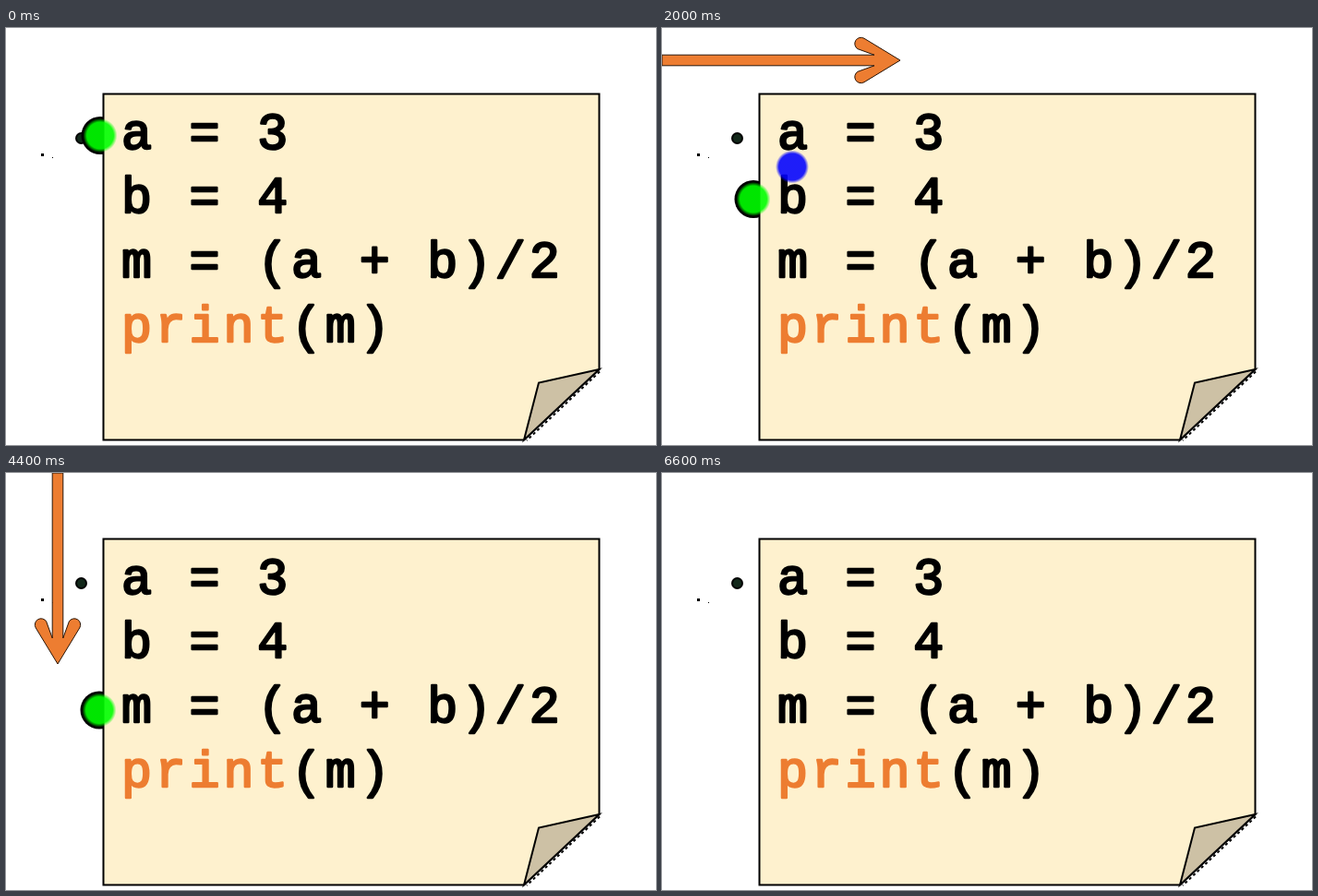
Recreate the animation shown at these times as an HTML page. Size 704x452 px, loop 6800 ms.

```html
<!DOCTYPE html>
<html>
<head>
<meta charset="utf-8">
<style>
  html, body { margin: 0; width: 100%; height: 100%; overflow: hidden; background: #fff; }
  svg { display: block; }
  text {
    font: 55px "Liberation Mono", monospace;
    letter-spacing: 3.8px;
    white-space: pre;
    stroke: #000;
    stroke-width: 2.4;
    stroke-linejoin: round;
  }
  .keyword { fill: #ed7d31; stroke: #ed7d31; }
</style>
</head>
<body>
<svg width="704" height="452" viewBox="0 0 704 452">
  <defs>
    <radialGradient id="green">
      <stop offset=".78" stop-color="#0f0" stop-opacity=".9"/>
      <stop offset="1" stop-color="#0f0" stop-opacity="0"/>
    </radialGradient>
    <radialGradient id="blue">
      <stop offset=".8" stop-color="#00f" stop-opacity=".88"/>
      <stop offset="1" stop-color="#00f" stop-opacity="0"/>
    </radialGradient>
  </defs>

  <circle cx="81.5" cy="119.5" r="5.5" fill="#12281a" stroke="#000" stroke-width="2"/>
  <path d="M38 136h3v3h-3zM50 140h1v1h-1z"/>

  <circle id="lineHalo" r="20.5"/>
  <circle id="tokenHalo" r="20"/>

  <g stroke="#000" stroke-width="2">
    <path d="M643 372.5L564 447" stroke-dasharray="3 3"/>
    <path d="M105.5 71.5H642.5V370L561 446.5H105.5Z" fill="#fef1ce"/>
    <path d="M642.5 370L577 384.5L561 446.5Z" fill="#cdc1a5"/>
  </g>

  <text x="125" y="131">a = 3</text>
  <text x="125" y="200">b = 4</text>
  <text x="125" y="270">m = (a + b)/2</text>
  <text x="125" y="340"><tspan class="keyword">print</tspan>(m)</text>

  <circle id="lineBall" r="18.5" fill="url(#green)"/>
  <circle id="tokenBall" r="18" fill="url(#blue)"/>
  <path id="arrow" fill="#ed7d31" stroke="#2a1608"/>
</svg>

<script>
const STEP = 200, STEPS = 34, CYCLE = 8;

// Per code line: marker position, then height and x stops of the token ball
const lines = [
  { marker: [102, 116.5], tokenY: 70.5, tokens: [141, 215, 290.5] },
  { marker: [99, 185.5], tokenY: 150.5, tokens: [141, 215, 290.5] },
  { marker: [101, 257], tokenY: 222, tokens: [139, 215, 441] },
  { marker: [105, 330], tokenY: 288.5, tokens: [234, 300, 365] }
];

const el = id => document.getElementById(id);

function place(name, point) {
  for (const id of [name + "Halo", name + "Ball"]) {
    el(id).style.display = point ? "" : "none";
    if (point) el(id).setAttribute("transform", `translate(${point})`);
  }
}

function arrowPath(length) {
  return `M${-length} -5.8H-28L-46 -12.3A6.5 6.5 0 0 1 -39 -23.7L0 0` +
    `L-39 23.7A6.5 6.5 0 0 1 -46 12.3L-28 5.8H${-length}Z`;
}

function drawArrow(length, transform) {
  el("arrow").setAttribute("d", length ? arrowPath(length) : "");
  el("arrow").setAttribute("transform", transform);
}

// Each cycle: three steps right, a pause, three steps down, next line
function render(step) {
  const shifted = step - 2 + CYCLE;
  const phase = shifted % CYCLE;
  const row = Math.floor(shifted / CYCLE) - 1;
  const line = lines[phase === 7 || row < 0 ? row + 1 : row];
  const running = row >= 0;

  place("line", line && line.marker);
  place("token", running && phase < 3 ? [line.tokens[phase], line.tokenY] : null);

  if (running && phase < 3) drawArrow(258, `translate(${258 + 223 * phase} 35)`);
  else if (running && phase > 3 && phase < 7)
    drawArrow(207, `translate(56 ${207 + 122.5 * (phase - 4)}) rotate(90)`);
  else drawArrow(0, "");
}

const start = performance.now();
function tick() {
  render(Math.floor((performance.now() - start) / STEP) % STEPS);
  requestAnimationFrame(tick);
}
tick();
</script>
</body>
</html>
```
